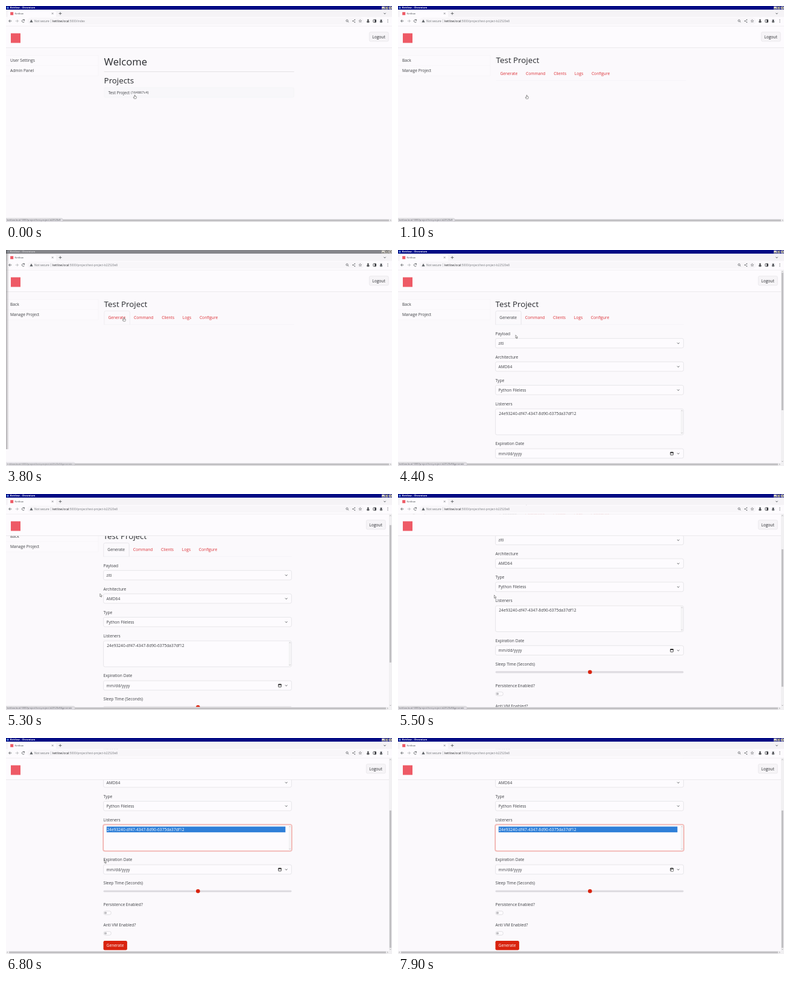
These frames come from a looping animation (640 by 360 pixels, 8000 ms). An HTML page with a canvas:

```html
<!DOCTYPE html>
<html lang="en">
<head>
<meta charset="utf-8">
<title>Kettlow</title>
<style>
html, body { margin: 0; width: 100%; height: 100%; overflow: hidden; background: #fbf9fc; }
canvas { display: block; width: 640px; height: 360px; }
</style>
</head>
<body>
<canvas id="stage" width="640" height="360"></canvas>
<script>
const ctx = document.getElementById('stage').getContext('2d');
const LOOP = 8000, REM = 20 / 3;
const FONT = '"Open Sans", "Noto Sans", sans-serif';
const INK = '#3c3e42', HEAD = '#26282c', RED = '#d9230f', LINK = '#dc3036';
const PAGE = '#fbf9fc', LINE = '#f1eff2', BORDER = '#d9d8dc', LOGO = '#ee5a66';
const HOST = 'kettlow.local', PROJECT = ':5000/project/test-project-b22520e8';

// time, x, y of the pointer tip
const POINTER = [
  [0, 213, 148.5], [2800, 213, 149], [3100, 210, 140], [3500, 196, 117],
  [3700, 195, 112.8], [4050, 195, 112.8], [4500, 195, 150], [4800, 165, 160],
  [5000, 150, 165], [5200, 153, 166], [5300, 155.8, 166], [5700, 163.2, 171],
  [6100, 172, 162], [6300, 180, 151], [6500, 180, 151], [6800, 163.2, 203.2],
  [6900, 168, 214], [7200, 169, 286], [7500, 171, 321], [7700, 172, 343],
  [7840, 173, 345], [7890, 453.5, 216.5], [8000, 453.5, 216.5]
];
const SCROLL = [[0, 0], [5200, 0], [5300, 20], [5400, 48], [5600, 109], [5700, 120], [8000, 120]];

const clamp = v => Math.max(0, Math.min(1, v));
const ramp = (t, from, to) => clamp((t - from) / (to - from));

function follow(keys, t) {
  let i = 1;
  while (i < keys.length - 1 && keys[i][0] < t) i++;
  const a = keys[i - 1], b = keys[i], k = ramp(t, a[0], b[0]);
  return a.slice(1).map((v, n) => v + (b[n + 1] - v) * k);
}

function box(x, y, w, h, color) {
  ctx.fillStyle = color;
  ctx.fillRect(x, y, w, h);
}

function panel(x, y, w, h, r, fill, stroke, width = 0.6) {
  ctx.beginPath();
  ctx.roundRect(x, y, w, h, r);
  if (fill) { ctx.fillStyle = fill; ctx.fill(); }
  if (stroke) { ctx.strokeStyle = stroke; ctx.lineWidth = width; ctx.stroke(); }
}

function disc(x, y, r, color) {
  ctx.fillStyle = color;
  ctx.beginPath();
  ctx.arc(x, y, r, 0, 7);
  ctx.fill();
}

function stroke(points, color, width = 0.8) {
  ctx.beginPath();
  points.forEach(([x, y], i) => i ? ctx.lineTo(x, y) : ctx.moveTo(x, y));
  ctx.strokeStyle = color;
  ctx.lineWidth = width;
  ctx.stroke();
}

// y is the middle of the capitals; drawn large and scaled for even spacing
function text(s, x, y, size = REM, color = INK, weight = 400) {
  ctx.save();
  ctx.translate(x, y + size * 0.357);
  ctx.scale(0.1, 0.1);
  ctx.font = `${weight} ${size * 10}px ${FONT}`;
  ctx.fillStyle = color;
  ctx.fillText(s, 0, 0);
  const w = ctx.measureText(s).width / 10;
  ctx.restore();
  return x + w;
}

function chevron(x, y, color = '#4a4d50', s = 1.8) {
  stroke([[x - s, y - s / 2], [x, y + s / 2], [x + s, y - s / 2]], color, 0.9);
}

function titleBar(active) {
  box(0, 0, 640, 6.3, active ? '#020a84' : '#85858a');
  disc(3, 3, 1.8, active ? '#5b8fe0' : '#9aa3ad');
  text('Kettlow - Chromium', 6.8, 2.9, 4.15, active ? '#fff' : '#c9c9cc', 700);
  [623, 628.7, 634.9].forEach((x, i) => {
    box(x, 0.8, 4.9, 4.7, '#d4d0c8');
    if (i === 0) box(x + 1, 4, 2.4, 0.8, '#222');
    if (i === 1) panel(x + 1.1, 1.6, 2.7, 2.6, 0, null, '#222', 0.6);
    if (i === 2) {
      stroke([[x + 1.2, 1.8], [x + 3.7, 4.4]], '#222', 0.7);
      stroke([[x + 3.7, 1.8], [x + 1.2, 4.4]], '#222', 0.7);
    }
  });
}

function tabStrip() {
  box(0, 6.3, 640, 12.2, '#f5f3f6');
  panel(3, 8, 80, 13, 3, '#fdfbfe');
  box(7.2, 10.2, 5, 5, LOGO);
  text('Kettlow', 14.6, 12.6, 4.1, '#45484c');
  stroke([[75.9, 11.2], [78.5, 13.8]], '#55585c', 0.6);
  stroke([[78.5, 11.2], [75.9, 13.8]], '#55585c', 0.6);
  stroke([[87.6, 12.5], [92.4, 12.5]], '#3c4043', 0.7);
  stroke([[90, 10.1], [90, 14.9]], '#3c4043', 0.7);
  chevron(628, 12.5, '#3c4043', 1.6);
}

function arrow(x, dir, color) {
  stroke([[x - 2.3 * dir, 25], [x + 2.3 * dir, 25]], color);
  stroke([[x, 22.8], [x + 2.3 * dir, 25], [x, 27.2]], color);
}

function toolbar(path) {
  box(0, 18.3, 640, 15, '#fdfbfe');
  panel(35.5, 19.5, 558, 11.4, 5.7, '#f8f6f9');
  arrow(7, -1, '#4a4d51');
  arrow(18, 1, '#a9abae');
  ctx.beginPath();
  ctx.arc(28.6, 25, 2.2, 0.5, 5.6);
  ctx.strokeStyle = '#4a4d51';
  ctx.lineWidth = 0.8;
  ctx.stroke();
  box(29.2, 22.6, 1.8, 1.6, '#4a4d51');

  ctx.beginPath();
  ctx.moveTo(42, 22.6);
  ctx.lineTo(44.6, 27.2);
  ctx.lineTo(39.4, 27.2);
  ctx.fillStyle = '#5f6368';
  ctx.fill();
  text('Not secure', 47, 25.1, 4.88, '#6a6d72');
  box(74.2, 22.2, 0.6, 5.6, '#b5b8bc');
  text(path, text(HOST, 77, 25.1, 4.79, '#26282b'), 25.1, 4.79, '#777a7f');

  const icon = '#54575b';
  ctx.beginPath();
  ctx.arc(565.5, 24.5, 1.6, 0, 7);
  ctx.strokeStyle = icon;
  ctx.stroke();
  stroke([[566.7, 25.7], [568.2, 27.2]], icon);
  const share = [[578.4, 23.1], [575, 25], [578.4, 26.9]];
  stroke(share, icon, 0.5);
  share.forEach(([x, y]) => disc(x, y, 0.75, icon));
  ctx.beginPath();
  for (let i = 0; i < 10; i++) {
    const r = i % 2 ? 1.1 : 2.5, a = -Math.PI / 2 + i * Math.PI / 5;
    ctx.lineTo(587.3 + r * Math.cos(a), 25.1 + r * Math.sin(a));
  }
  ctx.closePath();
  ctx.lineWidth = 0.5;
  ctx.stroke();
  disc(600.3, 23.6, 1.3, '#303236');
  panel(598.1, 25.2, 4.4, 2.2, 1, '#303236');
  panel(608.9, 22.8, 4.6, 4.4, 0.5, null, '#303236', 0.8);
  box(611.4, 22.8, 2.1, 4.4, '#303236');
  disc(622, 25, 3.2, '#e4e4e9');
  disc(622, 24, 1.2, '#303236');
  panel(620.1, 25.5, 3.8, 1.8, 0.9, '#303236');
  [22.9, 25, 27.1].forEach(y => disc(633, y, 0.55, icon));
  box(0, 33, 640, 0.5, '#e6e4e7');
}

function navbar(right) {
  box(0, 33.5, right, 36.2, '#fdfbfe');
  box(0, 69.2, right, 0.7, '#e4e2e6');
  box(8, 45.5, 16, 16, LOGO);
  panel(right - 37.6, 43.4, 31.8, 15.6, 2.2, '#f6f4f7', '#e3e1e5');
  text('Logout', right - 32.8, 51.2, REM, HEAD);
}

function sidebar(items, y) {
  box(0, y, 153, 34, '#fcfafd');
  items.forEach((s, i) => {
    box(0, y + 17 * i, 153, 0.5, '#f3f1f4');
    text(s, 7, y + 8.6 + 17 * i);
  });
  box(0, y + 34, 153, 0.5, '#f3f1f4');
  box(152.7, y, 0.5, 34, '#f3f1f4');
}

function welcome() {
  sidebar(['User Settings', 'Admin Panel'], 82.4);
  text('Welcome', 162.6, 93, REM * 2.5, HEAD);
  box(162.6, 109, 315, 0.6, '#d4d2d6');
  text('Projects', 162.6, 124.5, REM * 2, HEAD);
  panel(162.8, 136, 314.6, 16.2, 2, '#f8f7fa', '#f2f1f4');
  const x = text('Test Project ', 169.4, 144.2);
  text('(164867c4)', x, 144.3, REM * 0.875);
}

function projectHead(x, right, y, active, hover) {
  sidebar(['Back', 'Manage Project'], 82.4 - y);
  text('Test Project', x, 90.6 - y, REM * 2, HEAD);
  box(x, 123.8 - y, right - x, 0.6, LINE);
  if (active || hover) {
    panel(x + 0.3, 101.6 - y, 42.4, 22.6, [2.6, 2.6, 0, 0], PAGE, active ? '#dcdadf' : '#e6e4e8');
    box(x + 0.7, 123.6 - y, 41.6, 1, PAGE);
  }
  let left = x + 6.8;
  ['Generate', 'Command', 'Clients', 'Logs', 'Configure'].forEach((s, i) => {
    left = text(s, left, 113.1 - y, REM, active && !i ? INK : LINK) + 2 * REM + 0.4;
  });
}

function field(label, value, y) {
  text(label, 161.5, y);
  panel(161.6, y + 8.2, 311.8, 15.8, 2.4, '#fdfbfe', BORDER);
  text(value, 166.5, y + 16.2);
  chevron(464.7, y + 16.2);
}

function toggle(label, y) {
  text(label, 161.5, y);
  panel(161.8, y + 10.4, 12.6, 6.2, 3.1, '#fdfbfe', '#cfced2');
  disc(165, y + 13.5, 2.1, '#bfbec2');
}

function calendar(x, y) {
  panel(x - 2.3, y - 1.9, 4.6, 4.6, 0.4, null, '#222', 0.8);
  box(x - 2.5, y - 2.2, 5, 1.7, '#222');
}

function listeners(y, picked) {
  text('Listeners', 161.5, y);
  if (picked) panel(161.2, y + 8.2, 312.6, 44, 3, null, 'rgba(217,35,15,.25)', 2.2);
  panel(161.6, y + 8.6, 311.8, 43.2, 2.4, '#fdfbfe', picked ? '#ec918a' : BORDER);
  if (picked) box(166.8, y + 11.4, 296.5, 9.6, '#2f7fd8');
  text('24e93240-df47-4347-8d90-6375da37df12', 167.3, y + 16.2, REM, picked ? '#fff' : INK);
  box(468.7, y + 9.2, 4, 42, '#f4f3f5');
  stroke([[469.8, y + 12.1], [470.7, y + 11.2], [471.6, y + 12.1]], '#9a9a9d', 0.6);
  stroke([[469.8, y + 48.2], [470.7, y + 49.1], [471.6, y + 48.2]], '#9a9a9d', 0.6);
}

function form(y, picked) {
  field('Payload', 'ziti', 139.2 - y);
  field('Architecture', 'AMD64', 178.2 - y);
  field('Type', 'Python Fileless', 217.2 - y);
  listeners(256.2 - y, picked);
  field('Expiration Date', 'mm/dd/yyyy', 323 - y);
  calendar(454, 339 - y);
  text('Sleep Time (Seconds)', 161.5, 362 - y);
  panel(161.5, 373.7 - y, 312, 3.2, 1.6, '#dedce1');
  disc(318.3, 375.3 - y, 3.3, RED);
  toggle('Persistence Enabled?', 398 - y);
  toggle('Anti VM Enabled?', 432 - y);
  panel(161.5, 457.9 - y, 39.4, 15.7, 2.4, RED);
  text('Generate', 166.6, 465.8 - y, REM, '#fff');
}

function scrollbars(tall, y) {
  const right = tall ? 635 : 640;
  box(0, 354.8, 640, 5.2, '#f1f0f2');
  box(5, 355.7, right - 10, 3.2, '#c1c0c3');
  stroke([[3, 356.2], [2, 357.3], [3, 358.4]], '#6b6b6e', 0.6);
  stroke([[right - 3, 356.2], [right - 2, 357.3], [right - 3, 358.4]], '#6b6b6e', 0.6);
  if (!tall) return;
  box(635, 33.5, 5, 321.3, '#f1f0f2');
  box(635.8, 38 + y * 0.69, 3.2, 229, '#c1c0c3');
  stroke([[636.4, 36.6], [637.4, 35.6], [638.4, 36.6]], '#6b6b6e', 0.6);
  stroke([[636.4, 351.8], [637.4, 352.8], [638.4, 351.8]], '#6b6b6e', 0.6);
}

function status(url, width, alpha) {
  if (alpha <= 0) return;
  ctx.globalAlpha = alpha;
  panel(-1, 353.8, width + 1, 7, [0, 2, 0, 0], '#dfdde2', '#c9c8cc', 0.5);
  text(url, 1.6, 356.7, 3.95, '#55585d');
  ctx.globalAlpha = 1;
}

function shape(points, x, y) {
  ctx.beginPath();
  points.forEach(([a, b]) => ctx.lineTo(x + a, y + b));
  ctx.closePath();
  ctx.fillStyle = '#fff';
  ctx.fill();
  ctx.strokeStyle = '#333';
  ctx.lineWidth = 0.5;
  ctx.stroke();
}

function pointer(x, y, hand) {
  if (hand) {
    shape([[0, 0], [1, 0], [1, 2], [3.2, 2.5], [3.2, 4.6], [2.6, 6],
      [-0.6, 6], [-2, 3.6], [-1.2, 3.2], [0, 4]], x, y);
  } else {
    shape([[0, 0], [0, 5], [1.1, 4], [1.9, 5.9], [2.8, 5.5], [2, 3.7], [3.5, 3.6]], x, y);
  }
}

function sideShade() {
  const shade = ctx.createLinearGradient(0, 0, 5, 0);
  shade.addColorStop(0, 'rgba(0,0,0,.3)');
  shade.addColorStop(1, 'rgba(0,0,0,0)');
  box(0, 0, 5, 332, shade);
}

function draw(t) {
  const home = t < 1000, tall = t >= 4000, blurred = t >= 3300 && t < 3950;
  const [y] = follow(SCROLL, t);
  const overTab = t >= 3500 && t < 4150;

  box(0, 0, 640, 360, PAGE);
  if (home) welcome();
  else projectHead(tall ? 161.5 : 162.6, tall ? 473.5 : 477.5, y, tall, overTab);
  if (tall) {
    ctx.globalAlpha = ramp(t, 3950, 4150);
    form(y, t >= 6400);
    ctx.globalAlpha = 1;
  }
  navbar(tall ? 635 : 640);
  scrollbars(tall, y);
  titleBar(!blurred);
  tabStrip();
  toolbar(home ? ':5000/index' : PROJECT);

  if (blurred) sideShade();
  if (t < 2200) status(HOST + PROJECT, 94, 1 - ramp(t, 1650, 2100));
  else status(HOST + PROJECT + '#generate', 114, ramp(t, 3650, 3920) * (1 - ramp(t, 6150, 6400)));

  const [px, py] = follow(POINTER, t);
  const overButton = t >= 7650 && t < 7850;
  pointer(px, py, t < 1300 || overTab || overButton || t >= 7880);
}

let start;
function tick(now) {
  start ??= now;
  draw((now - start) % LOOP);
  requestAnimationFrame(tick);
}
draw(0);
requestAnimationFrame(tick);
</script>
</body>
</html>
```
